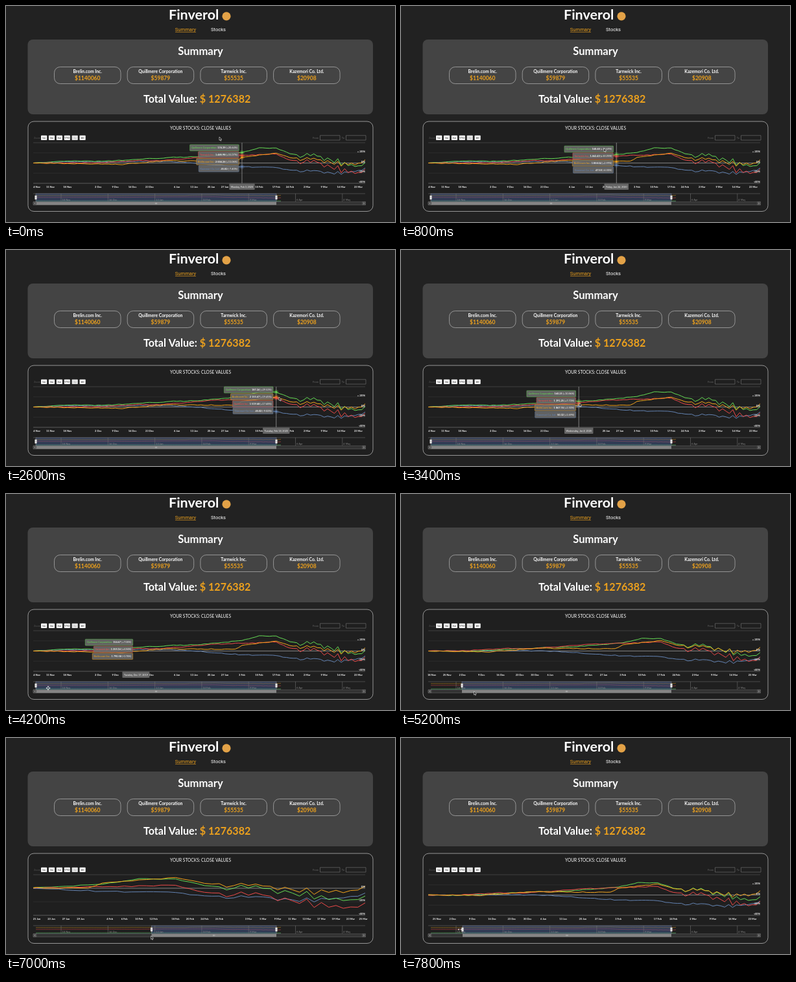
Animation of 600x335 px, one loop 8 s. Source, as an HTML page with a canvas:

```html
<!DOCTYPE html>
<html lang="en">
<head>
<meta charset="utf-8">
<title>Finverol</title>
<style>
  html, body { margin: 0; width: 100%; height: 100%; overflow: hidden; background: #222; }
  canvas { display: block; width: 600px; height: 335px; }
</style>
</head>
<body>
<canvas id="stage"></canvas>
<script>
const LOOP = 8000, STEP = 200;
const FONT = 'Lato, "Open Sans", sans-serif';
const ORANGE = '#eda11d';
const LAST = 97;
const PLOT = { x0: 42, x1: 554, y0: 212, y1: 275 };
const NAV = { x0: 46, x1: 417, y0: 291, y1: 303.5 };

const canvas = document.getElementById('stage');
const ctx = canvas.getContext('2d');
const dpr = window.devicePixelRatio || 1;
canvas.width = 600 * dpr;
canvas.height = 335 * dpr;

const lerp = (a, b, k) => a + (b - a) * k;
const clamp = (v, lo, hi) => Math.min(hi, Math.max(lo, v));

// Linear path through [position, value, ...] keys, held at both ends
function track(keys, t, c = 1) {
  if (t <= keys[0][0]) return keys[0][c];
  for (let i = 1; i < keys.length; i++) {
    const a = keys[i - 1], b = keys[i];
    if (t <= b[0]) return lerp(a[c], b[c], (t - a[0]) / (b[0] - a[0]));
  }
  return keys[keys.length - 1][c];
}

// Gain in percent at a few trading days; beta is the share of the market fall
const quill = {
  name: 'Quillmere Corporation', color: '#66dd55', base: 144.55, total: 59879, beta: 1, navY: 302.3,
  keys: [[0, 0], [10, 3.9], [20, 3.3], [30, 7], [40, 11], [48, 12.16], [61, 20.64], [66, 30], [71, 29.53]]
};
const tarn = {
  name: 'Tarnwick Inc.', color: '#ef4a4a', base: 1291.37, total: 55535, beta: 1.05, navY: 296.8,
  keys: [[0, 0], [20, 0.5], [30, 4.94], [37, 4.4], [48, 10.8], [53, 13.5], [61, 15.07], [71, 17.68]]
};
const brelin = {
  name: 'Brelin.com Inc.', color: '#f5a51c', base: 1804.66, total: 1140060, beta: 0.8, navY: 294,
  keys: [[0, 0], [25, -3], [30, -0.78], [38, 4.5], [48, 3.59], [59, 3.7], [61, 11.06], [71, 19.45], [88, 20], [97, 29]]
};
const kaze = {
  name: 'Kazemori Co. Ltd.', color: '#6484b4', base: 49.48, total: 20908, beta: 0.45, navY: 303,
  keys: [[0, 0], [10, 2.5], [40, 3], [48, -0.67], [61, -7.4], [71, -9.02], [88, -9], [97, 3]]
};
const stocks = [kaze, quill, tarn, brelin];
const MARKET = [[71, 0], [75, -11.5], [77, -12.5], [78, -19], [80, -13], [83, -14], [85, -23], [87, -21],
  [90, -30], [95, -36], [97, -30]];

function noise(n) {
  const v = Math.sin(n * 127.1) * 43758.5453;
  return v - Math.floor(v) - 0.5;
}

// Daily up-and-down that peaks in the worst week
function swing(i) {
  if (i < 80) return 0;
  const sign = (i % 2 === 0) === (i < 88) ? 1 : -1;
  return sign * (1.7 + 3.7 * Math.exp(-((i - 89) ** 2) / 4));
}

function dayValue(s, i, seed) {
  const jitter = s.keys.some(k => k[0] === i) ? 0 : noise(i + seed * 101) * 1.6;
  return track(s.keys, i) + s.beta * (track(MARKET, i) + swing(i)) + jitter;
}

stocks.forEach((s, k) => {
  s.values = Array.from({ length: LAST + 1 }, (_, i) => dayValue(s, i, k + 1));
});

// Trading days from 4 November 2019
const DAY = 86400000;
const HOLIDAYS = ['2019-11-28', '2019-12-25', '2020-01-01', '2020-01-20', '2020-02-17'];
const days = [];
for (let d = Date.UTC(2019, 10, 4); days.length <= LAST; d += DAY) {
  const date = new Date(d), wd = date.getUTCDay();
  if (wd % 6 && !HOLIDAYS.includes(date.toISOString().slice(0, 10))) days.push(date);
}
const part = (date, opts) => date.toLocaleDateString('en-US', { timeZone: 'UTC', ...opts });
const dayMonth = d => d.getUTCDate() + ' ' + part(d, { month: 'short' });
const longDate = d => part(d, { weekday: 'long', month: 'short', day: 'numeric', year: 'numeric' });

const DRAG_LAG = 100;
const HOVER = [[0, 61], [1600, 48], [2600, 71], [3800, 30]];
const HANDLE = [[4700, NAV.x0], [5200, 94], [6100, 280], [6700, 280], [7700, 95]];
const POINTER = [[0, 329, 203], [1600, 297, 238], [2600, 421, 228], [3800, 202, 242],
  [4200, 65, 301], [4700, 48, 298], [5200, 112.5, 306], [6100, 280.5, 311], [6700, 280.5, 311], [7700, 91, 297]];

function text(str, x, y, size, color = '#fff', weight = 400, align = 'center', family = FONT) {
  ctx.font = `${weight} ${size}px ${family}`;
  ctx.textAlign = align;
  ctx.fillStyle = color;
  ctx.fillText(str, x, y);
  return ctx.measureText(str).width;
}

function rect(x, y, w, h, fill) {
  ctx.fillStyle = fill;
  ctx.fillRect(x, y, w, h);
}

function box(x, y, w, h, r, fill, stroke, width = 0.8) {
  ctx.beginPath();
  ctx.roundRect(x, y, w, h, r);
  if (fill) { ctx.fillStyle = fill; ctx.fill(); }
  if (stroke) { ctx.strokeStyle = stroke; ctx.lineWidth = width; ctx.stroke(); }
}

function line(points, color, width) {
  ctx.beginPath();
  points.forEach(([x, y]) => ctx.lineTo(x, y));
  ctx.strokeStyle = color;
  ctx.lineWidth = width;
  ctx.stroke();
}

function dot(x, y, r, fill) {
  ctx.beginPath();
  ctx.arc(x, y, r, 0, Math.PI * 2);
  ctx.fillStyle = fill;
  ctx.fill();
}

function drawPage() {
  rect(0, 0, 600, 335, '#222');
  text('Finverol', 251, 21, 21.5, '#fff', 700, 'left');
  dot(340, 15.8, 6.6, '#e3a247');
  const nav = 'Roboto, Inter, sans-serif';
  text('Summary', 277, 39, 7.6, ORANGE, 400, 'center', nav);
  rect(261, 40, 32, 0.6, ORANGE);
  text('Stocks', 327.5, 39, 7.6, '#fff', 400, 'center', nav);

  box(33.5, 52, 532.5, 116, 8, '#444');
  text('Summary', 300, 76, 16.6, '#fff', 700);
  [brelin, quill, tarn, kaze].forEach((s, i) => {
    const x = 74.5 + i * 112.7;
    box(x, 94.5, 102.5, 26, 9, null, '#b8b8b8', 0.7);
    text(s.name, x + 51.2, 103.8, 6.8, '#fff', 700);
    text('$' + s.total, x + 51.2, 114.8, 8.5, ORANGE, 700);
  });
  const w = text('Total Value: ', 212, 150, 16.1, '#fff', 700, 'left');
  text('$ 1276382', 212 + w, 150, 16.1, ORANGE, 700, 'left');
}

function drawChartFrame() {
  box(34, 179, 532, 139.5, 9, '#1f1f1f', '#b4b4b4', 0.8);
  text('YOUR STOCKS: CLOSE VALUES', 300, 192, 6.6);
  text('Zoom', 43, 206, 3.9, '#555', 400, 'left');
  ['1m', '3m', '6m', 'YTD', '1y', 'All'].forEach((label, i) => {
    const x = 54 + i * 11.9;
    box(x, 200.7, 9.2, 7.3, 0.8, i === 4 ? '#e2e2e2' : '#fafafa');
    text(label, x + 4.6, 205.8, 4, i === 4 ? '#aaa' : '#222');
  });
  [['From', 484.5], ['To', 524.5]].forEach(([label, x]) => {
    text(label, x - 2.5, 206, 4, '#666', 400, 'right');
    box(x, 200.8, 30.5, 7.2, 0, null, '#777', 0.6);
  });
}

function makeView(start) {
  const base = Math.floor(start);
  const rel = (s, i) => ((100 + s.values[i]) / (100 + s.values[base]) - 1) * 100;
  let top = 0;
  for (const s of stocks) for (let i = base; i <= LAST; i++) top = Math.max(top, rel(s, i));
  const max = top > 18 ? 40 : 20;
  const gap = (PLOT.x1 - PLOT.x0) / (LAST - start);
  return {
    base, gap, max, rel,
    x: i => PLOT.x0 + (i - start) * gap,
    y: p => lerp(PLOT.y0, PLOT.y1, (max - p) / (max + 40))
  };
}

// Every second date when zoomed in, otherwise the Monday of each week
function axisTicks(v) {
  const daily = v.gap > 11;
  const ticks = [];
  days.forEach((d, i) => {
    const x = v.x(i), wd = d.getUTCDay();
    const newWeek = !i || wd < days[i - 1].getUTCDay();
    if (x < PLOT.x0 - 0.5 || !(daily ? (d / DAY) % 2 === 0 : newWeek)) return;
    ticks.push({ x, date: daily ? d : new Date(d - (wd - 1) * DAY) });
  });
  // A crowded label gives way to the next one, sooner when that opens a month
  return ticks.filter(({ x, date }, k) => {
    const next = ticks[k + 1];
    if (!next) return true;
    const newMonth = next.date.getUTCMonth() !== date.getUTCMonth();
    return next.x - x >= (newMonth ? 23.5 : 18);
  });
}

function drawAxes(v) {
  for (let p = v.max; p >= -40; p -= 20) {
    const y = v.y(p);
    const color = p === 0 ? '#aaa' : p === -40 ? '#777' : p === v.max ? '#505050' : '#333';
    line([[PLOT.x0, y], [PLOT.x1, y]], color, 0.7);
  }
  for (const { x, date } of axisTicks(v)) text(dayMonth(date), clamp(x, 47.5, 551), 281.7, 4, '#fff', 700);
}

function drawSeries(v) {
  ctx.save();
  ctx.beginPath();
  ctx.rect(PLOT.x0, PLOT.y0, PLOT.x1 - PLOT.x0, PLOT.y1 - PLOT.y0);
  ctx.clip();
  ctx.lineJoin = 'round';
  for (const s of stocks) {
    const pts = [];
    for (let i = v.base; i <= LAST; i++) pts.push([v.x(i), v.y(v.rel(s, i))]);
    line(pts, s.color, 1);
  }
  ctx.restore();
  for (let p = v.max - 20; p >= -40; p -= 20) {
    text((p > 0 ? '+ ' : '') + p + '%', PLOT.x1, v.y(p) - 0.8, 4.4, '#fff', 700, 'right');
  }
}

function drawTooltips(v, i, cross) {
  const x = v.x(i);
  if (cross) line([[x, PLOT.y0], [x, PLOT.y1]], '#aaa', 0.7);
  const shown = stocks.filter(s => i >= 40 || s !== kaze)
    .map(s => ({ s, y: v.y(s.values[i]) }))
    .sort((a, b) => a.y - b.y);
  if (cross) for (const { s, y } of shown) {
    ctx.globalAlpha = 0.25;
    dot(x, y, 3.6, s.color);
    ctx.globalAlpha = 1;
    dot(x, y, 1.5, s.color);
  }
  const pitch = 10.8, h = 9.8, right = x - 4.7;
  const mid = shown.reduce((sum, o) => sum + o.y, 0) / shown.length + 0.8;
  const top = Math.max(PLOT.y0, mid - shown.length * pitch / 2);
  shown.forEach(({ s }, k) => {
    const p = s.values[i];
    const price = (s.base * (1 + p / 100))
      .toLocaleString('en-US', { minimumFractionDigits: 2, maximumFractionDigits: 2 });
    const parts = [
      [s.name + ': ', 400, s.color],
      [price.replace(',', ' '), 700, '#fff'],
      [` (${p > 0 ? '+' : ''}${p.toFixed(2)}%)`, 400, '#fff']
    ];
    let w = 0;
    for (const [str, weight] of parts) {
      ctx.font = `${weight} 3.9px ${FONT}`;
      w += ctx.measureText(str).width;
    }
    const y = top + k * pitch;
    let tx = right - w - 2.4;
    box(tx - 2.4, y, w + 4.8, h, 0.8, 'rgba(108,108,108,.88)', s.color, 0.45);
    for (const [str, weight, color] of parts) tx += text(str, tx, y + 6.2, 3.9, color, weight, 'left');
  });
  const label = longDate(days[i]);
  ctx.font = `400 3.7px ${FONT}`;
  const w = ctx.measureText(label).width + 5;
  box(x - w / 2, 275.5, w, 9.5, 0.8, '#666');
  text(label, x, 281.6, 3.7);
}

function drawNavigator(left) {
  const { x0, x1, y0, y1 } = NAV;
  line([[42, y0], [left, y0]], '#666', 0.6);
  line([[x1, y0], [554, y0]], '#666', 0.6);
  ctx.globalAlpha = 0.75;
  for (const s of stocks) {
    const pts = s.values.map((p, i) => [lerp(x0, 424, i / LAST), s.navY - p * (s.base > 1000 ? 0.05 : 0.008)]);
    line(pts, s.color, 0.6);
  }
  ctx.globalAlpha = 1;
  rect(left, y0, x1 - left, y1 - y0, 'rgba(82,112,180,.36)');
  ['18 Nov', '16 Dec', '13 Jan', '10 Feb', '9 Mar', '6 Apr', '4 May'].forEach((label, i) => {
    const x = 85 + i * 72.3;
    line([[x, y0], [x, y1]], '#707070', 0.6);
    text(label, x + 1.5, 302, 4, '#888', 400, 'left');
  });
  line([[left, y1], [left, y0], [x1, y0], [x1, y1]], '#8d93a0', 0.6);

  box(42, 303.7, 512.5, 4.8, 0, '#333', '#666', 0.5);
  rect(left, 303.7, x1 - left, 4.8, '#858585');
  const mid = (left + x1) / 2;
  for (let k = -1; k <= 1; k++) line([[mid + k * 1.2, 305], [mid + k * 1.2, 307.3]], '#ddd', 0.4);
  [[42, -1], [549.7, 1]].forEach(([x, dir]) => {
    box(x, 303.7, 4.8, 4.8, 0, '#4a4a4a', '#777', 0.4);
    line([[x + 2.4 - dir, 305], [x + 2.4 + dir * 0.6, 306.1], [x + 2.4 - dir, 307.2]], '#ddd', 0.5);
  });
  for (const x of [left, x1]) {
    box(x - 1.5, 294, 3, 6, 0.4, '#f0f0f0', '#999', 0.4);
    line([[x, 295.5], [x, 298.5]], '#888', 0.4);
  }
}

function drawPointer(t) {
  ctx.save();
  ctx.translate(track(POINTER, t, 1), track(POINTER, t, 2));
  const moving = t >= 4200 && t < 4700;
  if (moving || t >= 7400) {
    for (let k = 0; k < 4; k += moving ? 1 : 2) {
      ctx.save();
      ctx.rotate(k * Math.PI / 2);
      line([[0.5, 0], [3, 0]], '#fff', 0.7);
      line([[1.8, -1.2], [3.1, 0], [1.8, 1.2]], '#fff', 0.7);
      ctx.restore();
    }
  } else {
    ctx.beginPath();
    [[0, 0], [0, 5.4], [1.2, 4.3], [2.1, 6.3], [3, 5.9], [2.1, 4], [3.8, 3.9]].forEach(p => ctx.lineTo(...p));
    ctx.closePath();
    ctx.fillStyle = '#111';
    ctx.fill();
    ctx.strokeStyle = '#eee';
    ctx.lineWidth = 0.6;
    ctx.stroke();
  }
  ctx.restore();
}

function draw(t) {
  ctx.setTransform(dpr, 0, 0, dpr, 0, 0);
  const dragged = track(HANDLE, t - DRAG_LAG);
  const view = makeView((dragged - NAV.x0) / (NAV.x1 - NAV.x0) * LAST);
  drawPage();
  drawChartFrame();
  drawAxes(view);
  drawSeries(view);
  drawNavigator(track(HANDLE, t));
  if (t < 4400) drawTooltips(view, Math.round(track(HOVER, t)), t < 4100);
  drawPointer(t);
}

const begin = performance.now();
function tick() {
  const t = (performance.now() - begin) % LOOP;
  draw(Math.floor(t / STEP) * STEP);
  requestAnimationFrame(tick);
}
tick();
</script>
</body>
</html>
```
